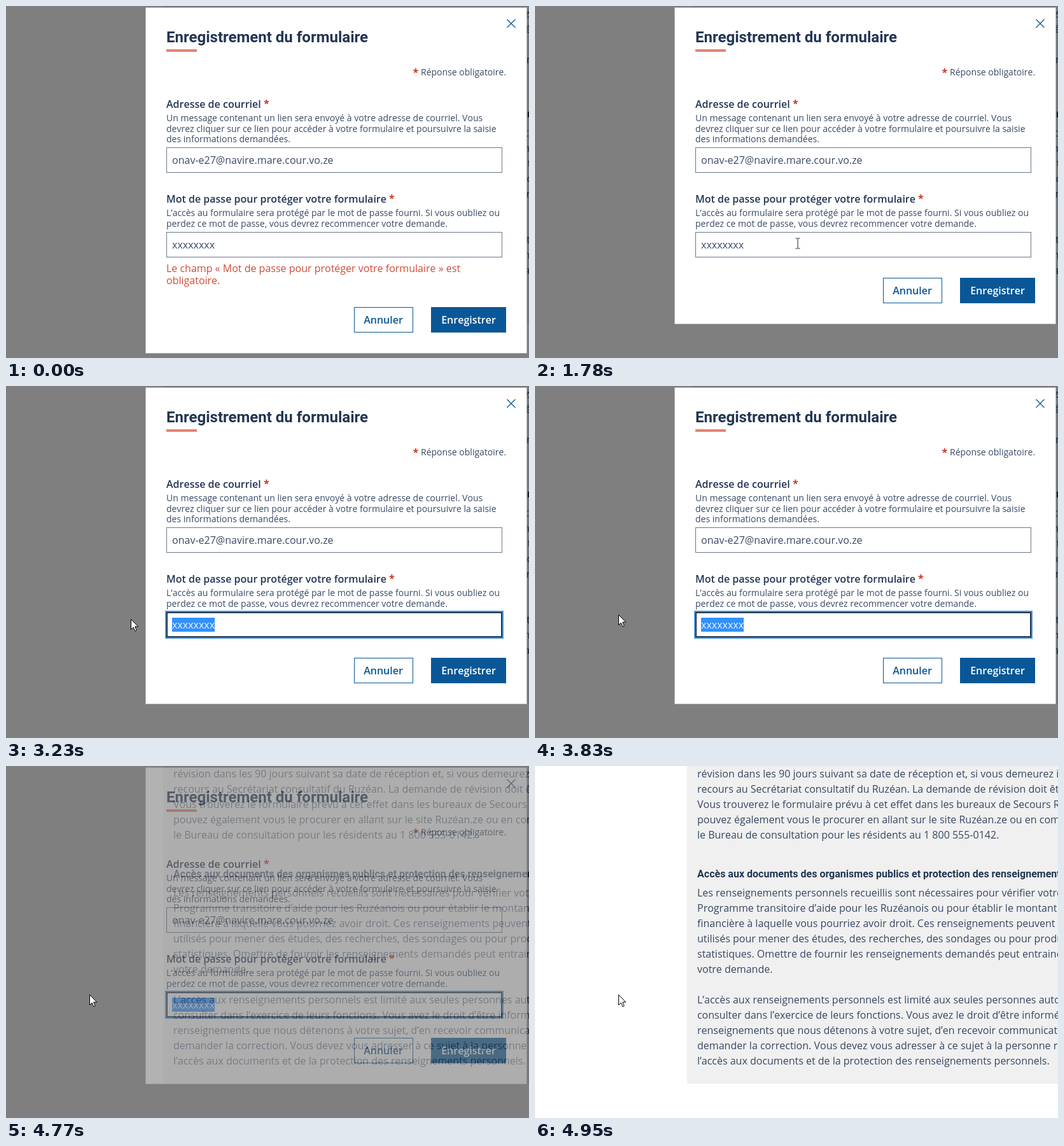
Animation, 822 px wide and 553 px high, one loop 7.09 s. Source, as an HTML page:

```html
<!DOCTYPE html>
<html lang="fr">
<head>
<meta charset="utf-8">
<title>Enregistrement du formulaire</title>
<style>
  html, body { margin: 0; width: 100%; height: 100%; overflow: hidden; background: #fff; }
  svg { display: block; font: 16px "Open Sans", sans-serif; font-kerning: none; fill: #223654; }
  text { fill-opacity: .9; }
  .head { font-family: Roboto, sans-serif; font-weight: 700; fill-opacity: 1; font-kerning: auto; }
  .label, .label text { font-weight: 600; fill-opacity: 1; }
  .help { font-size: 14px; }
  .star { font-weight: 700; fill: #cb381f; fill-opacity: 1; }
  .error { fill: #cb381f; }
  .field { fill: #fff; stroke: #6b778a; }
</style>
</head>
<body>
<svg width="822" height="553" viewBox="0 0 822 553">
  <g id="page"><rect x="239" width="600" height="499" fill="#f0f0f0"/></g>
  <rect id="shade" width="822" height="553" fill="#000" opacity=".5"/>
  <g id="dialog">
    <rect id="panel" x="219.5" y="2.5" width="599" fill="#fff" stroke="#bbb"/>
    <rect x="252" y="68" width="48" height="4" fill="#e58271"/>
    <path d="M787.5 21l13 13m0-13l-13 13" stroke="#095797" stroke-width="1.2"/>
    <rect class="field" x="252.5" y="222.5" width="527" height="39"/>
    <rect class="field" x="252.5" y="355.5" width="527" height="39"/>
    <g id="focus" fill="none" stroke-width="2">
      <rect x="251" y="354" width="530" height="42" stroke="#4a98d9"/>
      <rect x="253" y="356" width="526" height="38" stroke="#223654"/>
    </g>
    <g id="labels"></g>
    <rect id="mark" y="364" height="22" fill="#3390ff"/>
    <text id="picked" y="381" fill="#fff"></text>
    <g id="error" class="error">
      <text x="252" y="418">Le champ « Mot de passe pour protéger votre formulaire » est</text>
      <text x="252" y="437">obligatoire.</text>
    </g>
    <g id="buttons" class="label" text-anchor="middle">
      <rect x="547.5" y="427.5" width="92" height="39" fill="#fff" stroke="#095797"/>
      <text x="593" y="453" fill="#095797">Annuler</text>
      <rect x="668" y="427" width="118" height="40" fill="#095797"/>
      <text x="727" y="453" fill="#fff">Enregistrer</text>
    </g>
  </g>
  <g id="pointer">
    <circle id="press" cx="-2.5" cy="-.5" r="12" fill="#ffe51e" opacity=".8"/>
    <path id="beam" d="M-3.5-8h3m1 0h3M0-8V8M-3.5 8h3m1 0h3" fill="none" stroke="#222"/>
    <path id="arrow" d="M.5 .5V16.5L4.2 13 6.8 18.9 9.2 17.8 6.7 12H11.8Z" fill="#fff" stroke="#000"/>
  </g>
</svg>
<script>
const LOOP = 7090;
const $ = id => document.getElementById(id);
const show = (id, on) => $(id).style.display = on ? '' : 'none';

function addText(parent, x, y, text, cls = '', size = '') {
  $(parent).insertAdjacentHTML('beforeend',
    `<text x="${x}" y="${y}" class="${cls}" font-size="${size}">${text}</text>`);
}
function addLines(first, lines) {
  lines.forEach((line, i) => addText('page', 255, first + 24 * i, line));
}

addLines(18, [
  'révision dans les 90 jours suivant sa date de réception et, si vous demeurez insatisfait',
  'recours au Secrétariat consultatif du Ruzéan. La demande de révision doit être',
  'Vous trouverez le formulaire prévu à cet effet dans les bureaux de Secours Ruzéan',
  'pouvez également vous le procurer en allant sur le site Ruzéan.ze ou en communiquant',
  'le Bureau de consultation pour les résidents au 1 800 555-0142.'
]);
addText('page', 255, 175, 'Accès aux documents des organismes publics et protection des renseignements', 'head');
addLines(205, [
  'Les renseignements personnels recueillis sont nécessaires pour vérifier votre',
  'Programme transitoire d’aide pour les Ruzéanois ou pour établir le montant',
  'financière à laquelle vous pourriez avoir droit. Ces renseignements peuvent être',
  'utilisés pour mener des études, des recherches, des sondages ou pour produire',
  'statistiques. Omettre de fournir les renseignements demandés peut entrainer',
  'votre demande.'
]);
addLines(373, [
  'L’accès aux renseignements personnels est limité aux seules personnes autorisées',
  'consulter dans l’exercice de leurs fonctions. Vous avez le droit d’être informé',
  'renseignements que nous détenons à votre sujet, d’en recevoir communication',
  'demander la correction. Vous devez vous adresser à ce sujet à la personne responsable',
  'l’accès aux documents et de la protection des renseignements personnels.'
]);

[
  [252, 57, 'Enregistrement du formulaire', 'head', 24],
  [639.5, 110, '*', 'star'],
  [652, 109, 'Réponse obligatoire.', 'help'],
  [252, 160, 'Adresse de courriel', 'label'],
  [405, 159, '*', 'star'],
  [252, 181, 'Un message contenant un lien sera envoyé à votre adresse de courriel. Vous', 'help'],
  [252, 198, 'devrez cliquer sur ce lien pour accéder à votre formulaire et poursuivre la saisie', 'help'],
  [252, 214, 'des informations demandées.', 'help'],
  [261, 248, 'onav-e27@navire.mare.cour.vo.ze'],
  [252, 309, 'Mot de passe pour protéger votre formulaire', 'label'],
  [602, 308, '*', 'star'],
  [252, 330, 'L’accès au formulaire sera protégé par le mot de passe fourni. Si vous oubliez ou', 'help'],
  [252, 347, 'perdez ce mot de passe, vous devrez recommencer votre demande.', 'help'],
  [261, 381, 'xxxxxxxx']
].forEach(row => addText('labels', ...row));

// Pointer moves: start, end, number of steps
const moves = [[800, 1500, 11], [1600, 1780, 4], [2130, 2830, 12], [2920, 3620, 12], [3680, 3830, 3]];
// Pointer path: time, x, y
const path = [
  [800, 729, 527], [1010, 655, 483], [1290, 495, 403], [1500, 423.5, 373.5], [1780, 412.5, 373],
  [2130, 408, 373.5], [2575, 290.5, 374], [2830, 235, 372], [2920, 228, 371],
  [3556, 149, 358], [3620, 159, 363], [3680, 150, 352], [3830, 131, 359]
];
// Dialog fade: time, opacity
const fade = [[0, 1], [4670, .74], [4770, .4], [4830, .2], [4890, 0]];

function snap(t) {
  const [a, b, n] = moves.findLast(m => m[0] <= t) || moves[0];
  const step = Math.floor((t - a) / (b - a) * (n - 1) + 1e-6);
  return t < b ? a + Math.max(0, step) * (b - a) / (n - 1) : b;
}
function pointerAt(t) {
  const i = path.findIndex(p => p[0] >= t);
  if (i < 1) return path[0].slice(1);
  const [p, q] = [path[i - 1], path[i]];
  const k = (t - p[0]) / (q[0] - p[0]);
  return [p[1] + (q[1] - p[1]) * k, p[2] + (q[2] - p[2]) * k];
}

function draw(t) {
  const failed = t < 120, open = t < 4950;
  show('error', failed);
  $('panel').setAttribute('height', failed ? 543 : 497);
  $('buttons').setAttribute('transform', `translate(0 ${failed ? 46 : 0})`);
  $('page').setAttribute('transform', `translate(${open ? 8 : 0} 0)`);
  show('shade', open);
  $('dialog').setAttribute('opacity', fade.findLast(f => f[0] <= t)[1]);
  show('focus', t >= 1970);

  const [x, y] = pointerAt(snap(t));
  const inField = x > 240 && x < 780 && y > 355 && y < 395;
  show('pointer', t >= 800);
  show('beam', inField);
  show('arrow', !inField);
  show('press', inField && t >= 1970);
  $('pointer').setAttribute('transform', `translate(${Math.round(x)} ${Math.round(y)})`);

  const charWidth = 67 / 8;
  const start = t < 2130 ? 8 : Math.min(8, Math.max(0, Math.round((x - 261) / charWidth)));
  const left = 261 + start * charWidth;
  $('mark').setAttribute('x', left);
  $('mark').setAttribute('width', 328 - left);
  $('picked').setAttribute('x', left);
  $('picked').textContent = 'x'.repeat(8 - start);
}

function tick() {
  draw(performance.now() % LOOP);
  requestAnimationFrame(tick);
}
tick();
</script>
</body>
</html>
```
